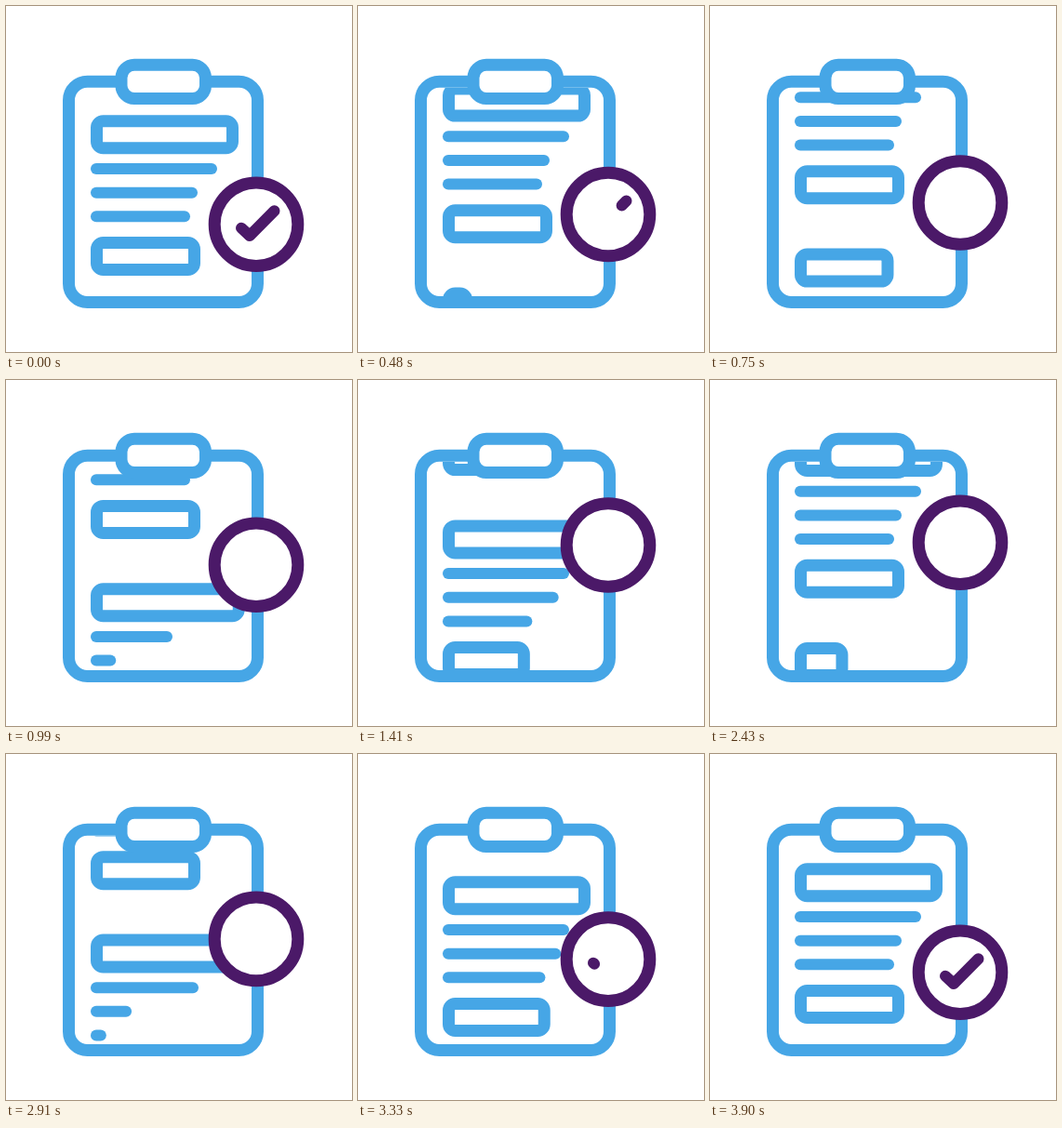
These frames come from a looping animation (372x372 px, 3.93 s). An HTML page with a canvas:

```html
<!DOCTYPE html>
<html lang="en">
<head>
<meta charset="utf-8">
<title>Checklist</title>
<style>
  html, body { margin: 0; width: 100%; height: 100%; overflow: hidden; background: #fff; }
  canvas { display: block; width: 372px; height: 372px; }
</style>
</head>
<body>
<canvas id="stage"></canvas>
<script>
const SIZE = 372, LOOP = 3930, STEP = 30;
const BLUE = '#46a6e6', PURPLE = '#4b1968';
const LEFT = 91, SPAN = 220;
const SCROLLS = [{ from: 16, to: 1862 }, { from: 1862, to: 3597 }];

const canvas = document.getElementById('stage');
const ratio = window.devicePixelRatio || 1;
canvas.width = canvas.height = SIZE * ratio;
const ctx = canvas.getContext('2d');
ctx.scale(ratio, ratio);
ctx.lineCap = ctx.lineJoin = 'round';

// Outer width, top and entrance timing of each entry on the sheet.
const entries = [
  { box: true, y: 117.3, w: 159, start: 286, dur: 815 },
  { y: 175, w: 136, start: 695, dur: 525 },
  { y: 200.7, w: 115, start: 833, dur: 620 },
  { y: 226.3, w: 107, start: 971, dur: 600 },
  { box: true, y: 248, w: 118, start: 1080, dur: 500 }
];

function ease(t, from, to) {
  const u = Math.min(1, Math.max(0, (t - from) / (to - from)));
  return u * u * (3 - 2 * u);
}

function frame(x, y, w, h, r, fill) {
  ctx.beginPath();
  ctx.roundRect(x, y, w, h, Math.min(r, w / 2));
  if (fill) {
    ctx.fillStyle = fill;
    ctx.fill();
  }
  ctx.stroke();
}

function drawEntry(e, width, dy) {
  ctx.strokeStyle = BLUE;
  if (e.box) {
    ctx.lineWidth = 13;
    frame(LEFT + 6.5, e.y + 6.5 + dy, Math.max(0.5, width - 13), 29, 7);
  } else {
    ctx.lineWidth = 12;
    ctx.beginPath();
    ctx.moveTo(LEFT + 6, e.y + dy);
    ctx.lineTo(LEFT + Math.max(6.1, width - 6), e.y + dy);
    ctx.stroke();
  }
}

// Grows past the full width, then settles back.
function grownWidth(e, t) {
  const end = e.start + e.dur;
  const peak = e.w * 1.11;
  return 12 + (peak - 12) * ease(t, e.start, end)
    - (peak - e.w) * ease(t, end, end + 150);
}

function drawSheet(t) {
  const { from, to } = SCROLLS[t < SCROLLS[1].from ? 0 : 1];
  const local = t - from;
  const shift = -SPAN * ease(t, from, to);

  ctx.save();
  ctx.beginPath();
  ctx.rect(68, 88, 202, 225);
  ctx.clip();
  for (const e of entries) {
    drawEntry(e, e.w, shift);
    if (local > e.start) drawEntry(e, grownWidth(e, local), shift + SPAN);
  }
  ctx.restore();

  ctx.strokeStyle = BLUE;
  ctx.lineWidth = 13;
  frame(67.5, 81.2, 203, 237.3, 20);
  frame(124, 63.2, 90.5, 36.3, 14, '#fff');
}

// Draws the part of a polyline between two fractions of its length.
function strokePart(points, from, to) {
  const lengths = points.slice(1).map((p, i) =>
    Math.hypot(p[0] - points[i][0], p[1] - points[i][1]));
  const total = lengths.reduce((a, b) => a + b);
  let done = 0;
  ctx.beginPath();
  lengths.forEach((len, i) => {
    const a = Math.max(0, (from * total - done) / len);
    const b = Math.min(1, (to * total - done) / len);
    done += len;
    if (a >= b) return;
    const [p, q] = [points[i], points[i + 1]];
    const at = k => [p[0] + (q[0] - p[0]) * k, p[1] + (q[1] - p[1]) * k];
    if (a > 0 || i === 0) ctx.moveTo(...at(a));
    ctx.lineTo(...at(b));
  });
  ctx.stroke();
}

function drawBadge(t) {
  const lift = 70.7 * (ease(t, 0, 1957) - ease(t, 1957, 3880));
  ctx.save();
  ctx.translate(269, 234.7 - lift);
  ctx.strokeStyle = PURPLE;
  ctx.fillStyle = '#fff';
  ctx.lineWidth = 13;
  ctx.beginPath();
  ctx.arc(0, 0, 44.8, 0, Math.PI * 2);
  ctx.fill();
  ctx.stroke();

  const tick = [[-16, 4], [-7, 12.3], [19.5, -14.5]];
  ctx.lineWidth = 12;
  const gone = ease(t, 0, 627), back = ease(t, 3270, 3850);
  if (gone < 1) strokePart(tick, gone, 1);
  else if (back > 0) strokePart(tick, 0, back);
  ctx.restore();
}

function render(now) {
  const t = Math.floor((now % LOOP) / STEP) * STEP;
  ctx.fillStyle = '#fff';
  ctx.fillRect(0, 0, SIZE, SIZE);
  drawSheet(t);
  drawBadge(t);
}

let begin;
function tick(now) {
  begin ??= now;
  render(now - begin);
  requestAnimationFrame(tick);
}
render(0);
requestAnimationFrame(tick);
</script>
</body>
</html>
```
